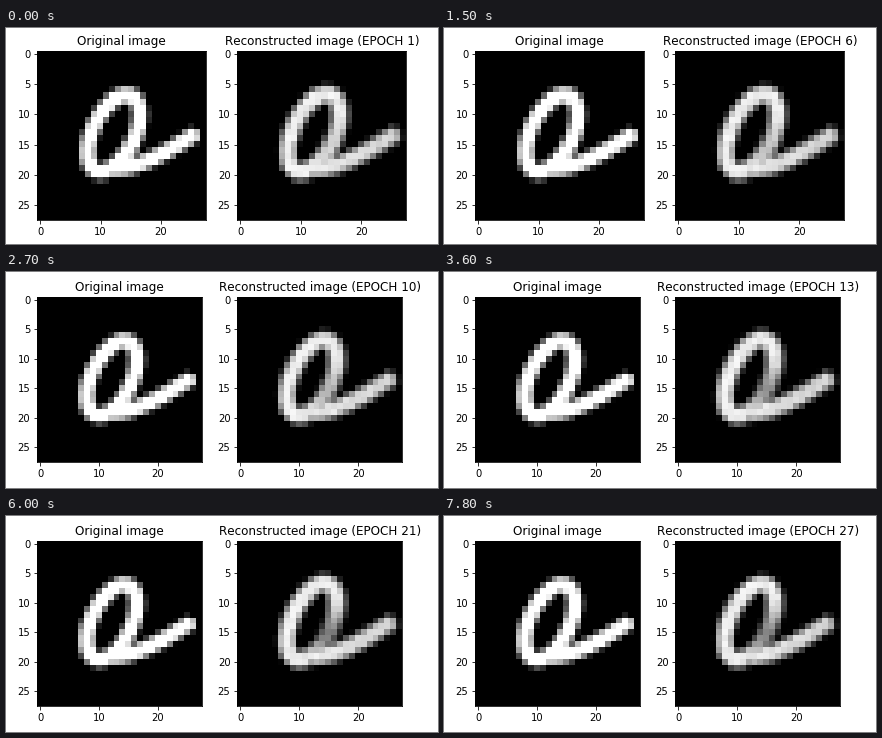
These frames come from a looping animation (432x216 px, 8000 ms). A matplotlib script:

```python
import numpy as np
import matplotlib.pyplot as plt
from matplotlib.animation import FuncAnimation

W, H, DPI = 432, 216, 72
STEP_MS, STEPS_PER_EPOCH, STEPS = 100, 3, 80
GRID = 28

plt.rcParams["text.kerning_factor"] = 6
rows, cols = np.mgrid[:GRID, :GRID]
theta = np.linspace(-np.pi, np.pi, 160)
t = np.linspace(0, 1, 90)


def brush(x, y, edge, soft, light):
    """Soft round brush along a curve, in (column, row) coordinates."""
    dist = np.hypot(cols[..., None] - x, rows[..., None] - y)
    return (light * np.clip((edge - dist) / soft, 0, 1)).max(axis=-1)


def letter(edge, soft, bowl_light=1.0, tail_light=1.0, lift=0.0):
    """Handwritten "a": a slanted ellipse with a curved tail."""
    bowl_x = 12.2 + 3.7 * np.cos(theta) + 2.1 * np.sin(theta)
    bowl_y = 13.25 - 6.3 * np.sin(theta) - lift * np.clip(np.sin(theta), 0, 1)
    start, bend, tip = (12.5, 19.0), (16.5, 19.3), (25.2, 13.6)
    tail_x, tail_y = ((1 - t) ** 2 * a + 2 * t * (1 - t) * b + t ** 2 * c
                      for a, b, c in zip(start, bend, tip))
    return np.maximum(brush(bowl_x, bowl_y, edge, soft, bowl_light),
                      brush(tail_x, tail_y, edge, soft, tail_light))


def reconstruction(epoch):
    # The stem slowly fades, and nearly breaks open around epoch 17
    slip = np.exp(-((epoch - 17) / 3) ** 2)
    fade = 0.12 + 0.012 * epoch + 0.6 * slip
    stem = np.exp(-((theta + np.radians(20)) / np.radians(40)) ** 2)
    image = letter(edge=1.98 + 0.25 * slip, soft=1.3,
                   bowl_light=0.97 - fade * stem,
                   tail_light=0.95 - 0.1 * t, lift=0.15 + 0.6 * slip)
    rng = np.random.default_rng(epoch)
    return image * rng.uniform(0.93, 1.0, image.shape)


def place(epoch):
    # The panels shrink once the title gains a second digit
    top, size = (23, 169) if epoch < 10 else (25, 165)
    for ax, left in zip(axes, (31.2, 231.4)):
        ax.set_position([left / W, 1 - (top + size) / H, size / W, size / H])


def panel(image, title):
    ax = fig.add_axes([0, 0, 1, 1], label=title)
    picture = ax.imshow(image, cmap="gray", vmin=0, vmax=1, aspect="auto",
                        interpolation="nearest")
    ax.set_xticks(range(0, GRID, 10))
    ax.set_yticks(range(0, GRID, 5))
    ax.set_title(title)
    return ax, picture


def update(step):
    epoch = 1 + step // STEPS_PER_EPOCH
    place(epoch)
    result.set_data(reconstruction(epoch))
    axes[1].set_title(f"Reconstructed image (EPOCH {epoch})")
    return [result]


fig = plt.figure(figsize=(W / DPI, H / DPI), dpi=DPI, facecolor="white")
left_ax, _ = panel(letter(edge=1.75, soft=1.0), "Original image")
right_ax, result = panel(reconstruction(1), "Reconstructed image")
axes = left_ax, right_ax

update(0)
anim = FuncAnimation(fig, update, frames=STEPS, interval=STEP_MS,
                     repeat=True, repeat_delay=0, blit=False)
plt.show()
```
